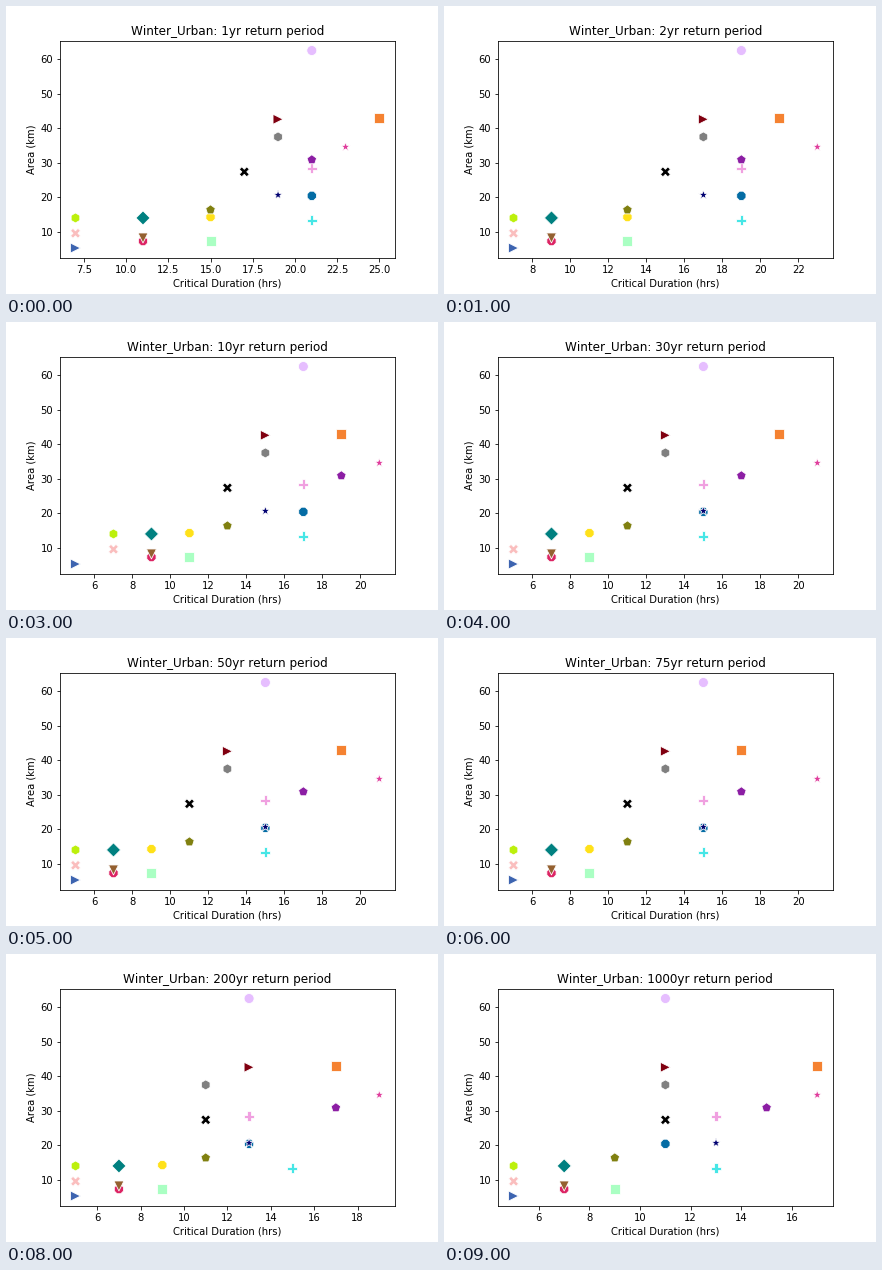
Write a matplotlib script that moves like this. It is 432 by 288 pixels and loops after 10000 ms.

```python
import math

import matplotlib.pyplot as plt
from matplotlib.animation import FuncAnimation
from matplotlib.markers import MarkerStyle

plt.rcParams["font.family"] = "DejaVu Sans"
plt.rcParams["text.kerning_factor"] = 6

PERIODS = [1, 2, 5, 10, 30, 50, 75, 100, 200, 1000]
SIZE = 100  # marker area in square points


class Site:
    """One catchment; its critical duration shrinks as storms get rarer."""

    def __init__(self, marker, color, area, start, drop, bend=0.7):
        style = MarkerStyle(marker)
        self.path = style.get_path().transformed(style.get_transform())
        self.color, self.area = color, area
        self.start, self.drop, self.bend = start, drop, bend

    def hours(self, period):
        rarity = math.log10(period) / math.log10(PERIODS[-1])
        value = self.start - self.drop * rarity ** self.bend
        return 2 * math.floor(value / 2) + 1  # odd hours only


SITES = [
    Site(">", "#3d64b0", 5.34, 6.6, 2.5),
    Site("8", "#dc2464", 7.35, 10.6, 4.5),
    Site("s", "#aaffc3", 7.3, 14.35, 6.3, 0.5),
    Site("v", "#946030", 8.25, 10.6, 4.5),
    Site("X", "#fabebe", 9.6, 7.4, 3),
    Site("P", "#46e6e6", 13.4, 21.2, 8.6),
    Site("h", "#bcf00c", 14.05, 7.9, 2.9),
    Site("8", "#ffe119", 14.3, 14.1, 6.9),
    Site("D", "#008080", 14.05, 10.6, 4.5),
    Site("p", "#808010", 16.4, 15.2, 6),
    Site("8", "#046ca4", 20.45, 21, 9.5),
    Site("*", "#000070", 20.7, 18.7, 6),
    Site("X", "#000000", 27.4, 16.35, 6.3, 0.5),
    Site("P", "#f0a0e0", 28.4, 20.5, 8.2),
    Site("p", "#8c1ea4", 30.9, 21.2, 6),
    Site("*", "#e03c9c", 34.6, 22.2, 4.3, 2),
    Site("h", "#808080", 37.5, 19.42, 9.4),
    Site(">", "#800010", 42.6, 18.1, 6.9),
    Site("s", "#f58231", 42.85, 24.1, 8.05, 0.5),
    Site("o", "#e6beff", 62.5, 21.95, 10.8),
]
AREAS = [site.area for site in SITES]


def padded(values, pixels):
    """Limits with a 5% margin and a little room for the marker radius."""
    reach = math.sqrt(SIZE) / 2 / pixels
    lo, hi = min(values) - reach, max(values) + reach
    pad = 0.05 * (hi - lo)
    return lo - pad, hi + pad


fig = plt.figure(figsize=(6, 4), dpi=72, facecolor="white")
ax = fig.add_axes([0.125, 0.125, 0.775, 0.755])
ax.set_xlabel("Critical Duration (hrs)")
ax.set_ylabel("Area (km)")
ax.set_ylim(padded(AREAS, ax.bbox.height))
title = ax.set_title("")

points = ax.scatter(AREAS, AREAS, s=SIZE, c=[site.color for site in SITES],
                    edgecolor="white", linewidth=0.8)
points.set_paths([site.path for site in SITES])


def draw(i):
    hours = [site.hours(PERIODS[i]) for site in SITES]
    points.set_offsets(list(zip(hours, AREAS)))
    ax.set_xlim(padded(hours, ax.bbox.width))
    title.set_text(f"Winter_Urban: {PERIODS[i]}yr return period")
    return points, title


anim = FuncAnimation(fig, draw, frames=len(PERIODS), interval=1000,
                     repeat=True, repeat_delay=0, blit=False)
plt.show()
```
